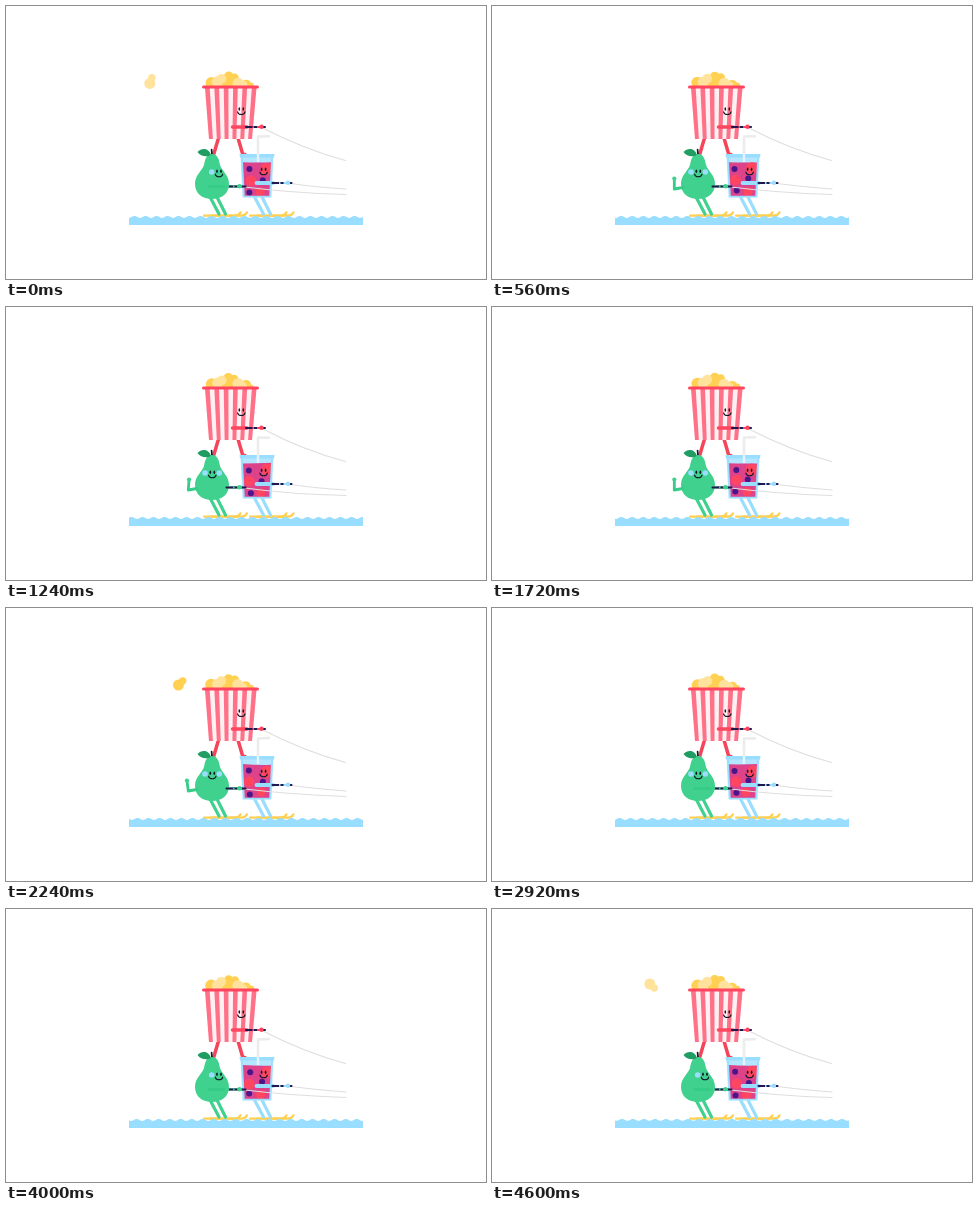
Write an HTML page with a canvas that moves like this. It is 480 px wide and 273 px high and loops after 4640 ms.

```html
<!DOCTYPE html>
<html lang="en">
<head>
<meta charset="utf-8">
<title>Snacks on water skis</title>
<style>
  html, body { margin: 0; width: 100%; height: 100%; overflow: hidden; background: #fff; }
  canvas { display: block; width: 480px; height: 273px; }
</style>
</head>
<body>
<canvas id="stage" width="480" height="273"></canvas>
<script>
const LOOP = 4640, TAU = Math.PI * 2;
const ctx = document.getElementById('stage').getContext('2d');
const RED = '#ff455f', PINK = '#ff7188', GREEN = '#41d18e', ARM = '#35cc87',
      BLUE = '#99ddff', NAVY = '#20184f', YELLOW = '#ffd052', CREAM = '#ffe29c',
      ROPE = '#dedede', INK = '#111827', PURPLE = '#4b1689';

const mix = (a, b, k) => a + (b - a) * k;
const ramp = (t, from, to) => {
  const k = Math.min(1, Math.max(0, (t - from) / (to - from)));
  return k * k * (3 - 2 * k);
};
// Oscillation with a whole number of cycles per loop
const swing = (t, cycles, phase = 0) => Math.sin(TAU * cycles * t / LOOP + phase);

function fill(path, color) {
  ctx.fillStyle = color;
  ctx.fill(new Path2D(path));
}
function stroke(path, color, width, cap = 'round') {
  ctx.strokeStyle = color;
  ctx.lineWidth = width;
  ctx.lineCap = cap;
  ctx.lineJoin = 'round';
  ctx.stroke(new Path2D(path));
}
function dot(x, y, r, color, ry = r) {
  ctx.fillStyle = color;
  ctx.beginPath();
  ctx.ellipse(x, y, r, ry, 0, 0, TAU);
  ctx.fill();
}
function face(x, y) {
  dot(x - 2, y - 2, .85, INK, 1.8);
  dot(x + 2, y - 2, .85, INK, 1.8);
  stroke(`M${x - 3.7} ${y + .8}C${x - 3} ${y + 4.4} ${x + 3} ${y + 4.4} ${x + 3.7} ${y + .8}`, INK, 1.1);
}
function handle(x, y, color, grip) {
  stroke(`M${x} ${y}H${x + 19}`, NAVY, 2.1);
  stroke(`M${x + 6.5} ${y}h1.5M${x + 11} ${y}h4.5`, color, 2.2, 'butt');
  dot(x + grip, y - .2, 2.2, color);
}

function flyingPopcorn(t) {
  const FLIGHT = 2320, shifted = t + 168;
  const age = shifted % FLIGHT;
  if (age > 250) return;
  const golden = Math.floor(shifted / FLIGHT) === 1;
  const angle = (45 - 2.8 * (age - 128) - (golden ? 199 : 0)) * TAU / 360;
  const x = 206 - .365 * age, c = Math.cos(angle), s = Math.sin(angle);
  const color = golden ? YELLOW : CREAM;
  dot(x - 1.5 * c, 76 - 1.5 * s, 5.5, color);
  dot(x + 4.5 * c, 76 + 4.5 * s, 3.7, color);
}

function popcornPile(t) {
  [[205.5, 77, 6, 0], [240, 78.5, 5, 0], [222.5, 70.8, 4.9, 0], [228.5, 71.8, 4.3, 0],
   [222, 77, 7, 0], [211.5, 76, 5.5, 1], [215.5, 73, 4.8, 1], [232, 77, 5.6, 1], [237, 79, 4, 1], [245, 80, 3, 0]]
    .forEach(([x, y, r, pale], i) =>
      dot(x + .3 * swing(t, 16, i), y + .4 * swing(t, 24, i * 2), r, pale ? CREAM : YELLOW));
}

function bucket() {
  fill('M199 82H250.500L246 133H203Z', '#fff0f2');
  for (let i = 0; i < 11; i += 2) {
    const top = k => 199 + 51.5 * k / 11, bottom = k => 203 + 43 * k / 11;
    fill(`M${top(i)} 82H${top(i + 1)}L${bottom(i + 1)} 133H${bottom(i)}Z`, PINK);
  }
  stroke('M197.500 81H251.500', RED, 3);
  face(235.3, 105);
}

function drink(t) {
  stroke('M248 190L257.500 208M255.500 190L264.500 208', BLUE, 3.2);
  stroke(`M252 152V130.500L264 ${130.3 + .5 * swing(t, 8)}`, '#ececec', 2.6, 'butt');
  fill('M234.500 150H267.500L265.500 191.500H236.500Z', '#b5e6ff');
  const glass = new Path2D('M236 152H266L264 190H238Z');
  const tilt = .8 * swing(t, 8);
  ctx.save();
  ctx.clip(glass);
  fill(`M230 ${156 + tilt}Q251 ${157 - tilt} 272 ${156 - tilt}V195H230Z`, '#dd438b');
  [[260.5, 163, 6], [244, 174, 5.3], [255, 185, 4.5]].forEach(([x, y, r], i) =>
    dot(x + swing(t, 5, i * 2), y + swing(t, 7, i), r, RED));
  [[243.4, 163, 3], [256, 173.3, 3], [244, 185.5, 3]].forEach(([x, y, r], i) =>
    dot(x + .9 * swing(t, 6, i * 2), y + swing(t, 4, i), r, PURPLE));
  ctx.restore();
  stroke('M236 152L238 190.500H264L266 152', BLUE, 1.6);
  fill('M233.500 148H268.500L268 151.500H234Z', BLUE);
  stroke('M252 148V156', '#e4f5ff', 2.4, 'butt');
  face(257.6, 165.3);
}

function pear(t) {
  const front = ramp(t, 160, 320) * (1 - ramp(t, 3760, 3920));
  const faceX = mix(213, 206.3, front);
  stroke('M203.500 190L213 208M210.500 190L219.500 208', GREEN, 3.2);
  stroke('M206 149L205.600 143.500', INK, 1.7);
  fill('M206 148C212 148 213 154 214 159C216 165 223 169 223 178C223 188 215 193 206 193' +
       'C197 193 189 188 189 178C189 169 196 165 198 159C199 154 200 148 206 148Z', GREEN);
  fill('M204.800 149C203 142 195.500 141.500 191.500 146C195 151 201 151 204.800 149Z', '#1f9d63');
  dot(faceX - 7.3, 166, 2.8, BLUE);
  if (front > .05) dot(faceX + 7, 166, 2.8 * front, BLUE);
  face(faceX, 167.3);
}

function pearArms(t) {
  const raised = ramp(t, 300, 500) * (1 - ramp(t, 2500, 2720));
  const wave = swing(t, 12) * raised;
  const shoulderX = mix(203, 191, raised), shoulderY = mix(180.5, 181.5, raised);
  const elbowX = mix(212, 182.3, raised), elbowY = mix(180.5, 183, raised);
  const handX = mix(221, 182, raised) + 1.1 * wave, handY = mix(180.5, 172.5, raised);
  stroke('M224 180.400H237', GREEN, 2.4);
  handle(220.5, 180.5, GREEN, 13);
  stroke(`M${shoulderX} ${shoulderY}L${elbowX} ${elbowY}L${handX} ${handY}`, ARM, 2.8);
  dot(handX, handY, 2.1, GREEN);
}

function skis() {
  for (const x of [198, 204.5, 244, 251])
    stroke(`M${x} 209.700H${x + 31}Q${x + 35} 209.500 ${x + 36.5} 206.300`, YELLOW, 2.2);
}

function water(t) {
  const PERIOD = 11;
  const shift = t / LOOP * 16 * PERIOD;
  let path = 'M123 219';
  for (let x = 123; x <= 357; x++)
    path += `L${x} ${210.9 + Math.cos(TAU * (x + shift - 123) / PERIOD)}`;
  fill(path + 'L357 219Z', BLUE);
}

function draw(t) {
  ctx.clearRect(0, 0, 480, 273);
  ctx.save();
  ctx.beginPath();
  ctx.rect(123, 0, 234, 273);
  ctx.clip();
  const sway = .5 * swing(t, 8);
  flyingPopcorn(t);
  popcornPile(t);
  stroke('M212.500 132L207.500 149M232 132L236.800 148.500H239', '#f4455b', 3.5);
  bucket();
  skis();
  drink(t);
  pear(t);
  stroke(`M257 122Q${297 + sway} ${143 + sway} 339.500 154.500`, ROPE, 1.1);
  stroke(`M239 181Q285 ${187 + sway} 340 188.500`, ROPE, 1.1);
  stroke(`M285 177.500Q310 ${181 + sway} 340 183`, ROPE, 1.1);
  stroke('M226.500 121H241', RED, 3.5);
  handle(240, 121, RED, 15.5);
  stroke('M250.500 177H267', BLUE, 3.8);
  handle(266.5, 177, BLUE, 15.5);
  pearArms(t);
  water(t);
  ctx.restore();
}

const start = performance.now();
function tick() {
  draw((performance.now() - start) % LOOP);
  requestAnimationFrame(tick);
}
tick();
</script>
</body>
</html>
```
